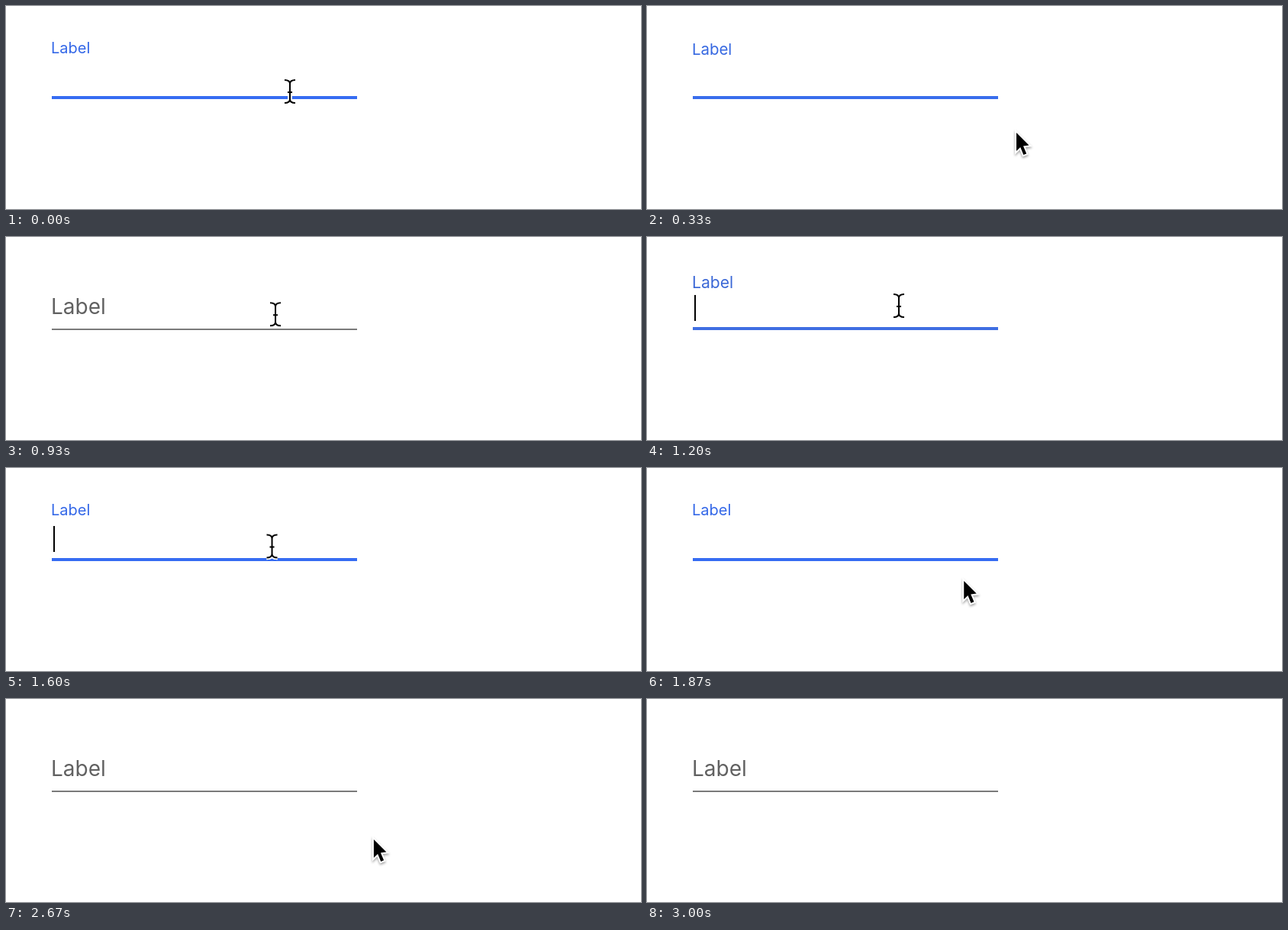
An HTML page for the animation above (3740 ms loop, 832 px wide and 266 px high).

```html
<!DOCTYPE html>
<html lang="en">
<head>
<meta charset="utf-8">
<title>Text field</title>
<style>
  html, body { margin: 0; width: 100%; height: 100%; overflow: hidden; background: #fff; }
  svg { display: block; }
  text { font: 28px Inter, "Liberation Sans", sans-serif; }
  #arrow { filter: drop-shadow(0 2px 1.5px rgba(0, 0, 0, .35)); }
</style>
</head>
<body>
<svg width="832" height="266" viewBox="0 0 832 266">
  <text id="label">Label</text>
  <rect id="line" x="60" width="400"/>
  <rect id="caret" x="62" y="76" width="2" height="34"/>
  <g id="beam" fill="none">
    <path id="stem" d="M-7-15Q0-15 0-10V10Q0 15-7 15M7-15Q0-15 0-10M0 10Q0 15 7 15M-3 1H3" stroke="#fff" stroke-width="5.5"/>
    <use href="#stem"/>
    <path d="M-7-15Q0-15 0-10V10Q0 15-7 15M7-15Q0-15 0-10M0 10Q0 15 7 15M-3 1H3" stroke="#000" stroke-width="2"/>
  </g>
  <path id="arrow" d="M0 0V24L5.2 19 9.3 29 13.2 27.4 9 17.5 16.5 16.5z"
        stroke="#fff" stroke-width="4" paint-order="stroke"/>
</svg>
<script>
const LOOP = 3740, FPS = 15, FADE = 200;
const el = id => document.getElementById(id);
const [label, line, caret, beam, arrow] = ['label', 'line', 'caret', 'beam', 'arrow'].map(el);

// Pointer moves: start, end, target x, target y
const moves = [
  [0, 333, 484, 166],
  [510, 1070, 330, 90],
  [1430, 2130, 455, 175],
  [2500, 2730, 488, 186],
  [2870, 2930, 545, 153]
];
// Focus changes: time, focused
const toggles = [[320, 0], [1086, 1], [2452, 0]];

const lerp = (a, b, p) => a + (b - a) * p;
const clamp = p => Math.min(1, Math.max(0, p));
const smooth = p => p * p * (3 - 2 * p);
const mix = (a, b, p) => `rgb(${a.map((v, i) => Math.round(lerp(v, b[i], p)))})`;
const show = (node, on) => node.setAttribute('visibility', on ? 'visible' : 'hidden');
const within = (t, a, b) => t >= a && t < b;

// CSS "ease" timing curve
function ease(x) {
  const bezier = (a, b, s) => 3 * a * s * (1 - s) ** 2 + 3 * b * s * s * (1 - s) + s ** 3;
  let lo = 0, hi = 1;
  for (let i = 0; i < 20; i++) {
    const mid = (lo + hi) / 2;
    if (bezier(.25, .25, mid) < x) lo = mid; else hi = mid;
  }
  return bezier(.1, 1, lo);
}

function drawField(t) {
  let focus = 1;
  for (const [start, to] of toggles)
    if (t >= start) focus = lerp(1 - to, to, ease(clamp((t - start) / FADE)));

  label.setAttribute('transform', `translate(59 ${lerp(101, 62, focus)}) scale(${lerp(1, 20 / 28, focus)})`);
  label.setAttribute('fill', mix([97, 97, 97], [52, 104, 232], focus));

  const weight = Math.round(lerp(2, 4, focus));
  line.setAttribute('y', 122 - weight);
  line.setAttribute('height', weight);
  line.setAttribute('fill', mix([122, 122, 122], [54, 108, 242], focus));

  show(caret, within(t, 1090, 1640) || within(t, 2100, 2452));
}

function drawPointer(t) {
  let x = 372, y = 112;
  for (const [start, end, toX, toY] of moves) {
    const p = smooth(clamp((t - start) / (end - start)));
    x = lerp(x, toX, p);
    y = lerp(y, toY, p);
  }
  const visible = t < 2990, overField = y < 118;
  for (const node of [beam, arrow]) node.setAttribute('transform', `translate(${x} ${y})`);
  show(beam, visible && overField);
  show(arrow, visible && !overField);
}

let began;
function frame(now) {
  began ??= now;
  const t = Math.floor((now - began) % LOOP * FPS / 1000 + .06) * 1000 / FPS;
  drawField(t);
  drawPointer(t);
  requestAnimationFrame(frame);
}
requestAnimationFrame(frame);
</script>
</body>
</html>
```
